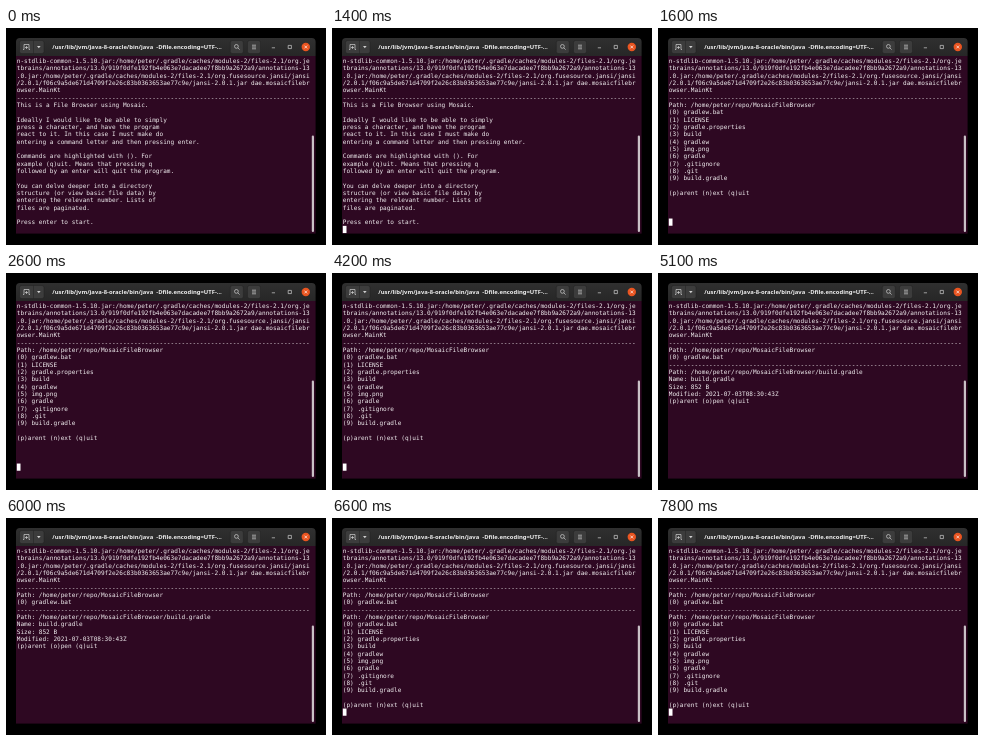
An HTML page for the animation above (8 s loop, 320 by 217 pixels).

```html
<!DOCTYPE html>
<html lang="en">
<head>
<meta charset="utf-8">
<title>Terminal file browser</title>
<style>
  html, body { margin: 0; width: 100%; height: 100%; overflow: hidden; background: #000; }
  svg { display: block; width: 320px; height: 217px; }
  text { white-space: pre; }
  .title { font: bold 5.86px "Noto Sans", "Open Sans", sans-serif; fill: #f0f0f0; }
  .row { font: 6.08px "DejaVu Sans Mono", "Liberation Mono", monospace; fill: #f2eff1; }
  .icon { fill: none; stroke: #d0d0d0; stroke-width: .7; }
  .button { fill: #3c3c3c; stroke: #222; stroke-width: .5; }
</style>
</head>
<body>
<svg viewBox="0 0 320 217">
  <defs>
    <linearGradient id="bar" x2="0" y2="1">
      <stop stop-color="#303030"/><stop offset="1" stop-color="#272727"/>
    </linearGradient>
  </defs>
  <rect width="320" height="217"/>
  <path d="M10 28V14a4 4 0 0 1 4-4H305.6a4 4 0 0 1 4 4V28Z" fill="url(#bar)"/>
  <rect x="10" y="28" width="299.6" height="177.6" fill="#2e0822"/>

  <rect class="button" x="13.5" y="12.5" width="24.5" height="13" rx="2"/>
  <path class="button" d="M27.5 12.5v13"/>
  <path class="icon" d="M17 21.5h1v-5h5v5h1M20.5 18v3M19 19.5h3"/>
  <path d="M31 18h3.6l-1.8 2.2z" fill="#d0d0d0"/>
  <text class="title" x="46.3" y="21.2">/usr/lib/jvm/java-8-oracle/bin/java  -Dfile.encoding=UTF-…</text>
  <rect class="button" x="224.3" y="12.5" width="13" height="13" rx="2"/>
  <circle class="icon" cx="230.4" cy="18.4" r="1.9"/>
  <path class="icon" d="M231.8 19.8l1.8 1.8"/>
  <rect class="button" x="241.5" y="12.5" width="13" height="13" rx="2"/>
  <path class="icon" d="M246 17.2h4M246 19h4M246 20.8h4"/>
  <path class="icon" d="M265.8 19.8h3.2M282.2 17.4h3.2v3.2h-3.2z"/>
  <circle cx="299.8" cy="19" r="4.2" fill="#e95420"/>
  <path class="icon" d="M298.4 17.6l2.8 2.8M301.2 17.6l-2.8 2.8" style="stroke:#fff"/>

  <rect x="305.8" y="107.5" width="2.2" height="96.6" rx="1.1" fill="#c9c1c6"/>
  <g id="rows"></g>
  <rect id="cursor" x="10.8" width="3.7" height="7.2" fill="#fff"/>
</svg>
<script>
const LOOP = 8000, TOP = 29.5, PITCH = 7.32;
const rule = "-".repeat(80);
const repo = "Path: /home/peter/repo/MosaicFileBrowser";
const cache = "/home/peter/.gradle/caches/modules-2/files-2.1/";

const head = [
  "n-stdlib-common-1.5.10.jar:" + cache + "org.je",
  "tbrains/annotations/13.0/919f0dfe192fb4e063e7dacadee7f8bb9a2672a9/annotations-13",
  ".0.jar:" + cache + "org.fusesource.jansi/jansi",
  "/2.0.1/f06c9a5de671d4709f2e26c83b0363653ae77c9e/jansi-2.0.1.jar dae.mosaicfilebr",
  "owser.MainKt",
  rule
];
const intro = `This is a File Browser using Mosaic.

Ideally I would like to be able to simply
press a character, and have the program
react to it. In this case I must make do
entering a command letter and then pressing enter.

Commands are highlighted with (). For
example (q)uit. Means that pressing q
followed by an enter will quit the program.

You can delve deeper into a directory
structure (or view basic file data) by
entering the relevant number. Lists of
files are paginated.

Press enter to start.`.split("\n");
const files = ["gradlew.bat", "LICENSE", "gradle.properties", "build", "gradlew",
  "img.png", "gradle", ".gitignore", ".git", "build.gradle"].map((f, i) => `(${i}) ${f}`);
const list = [repo, ...files, "", "(p)arent (n)ext (q)uit"];
const kept = [repo, files[0], rule];
const info = [repo + "/build.gradle", "Name: build.gradle", "Size: 852 B",
  "Modified: 2021-07-03T08:30:43Z", "(p)arent (o)pen (q)uit"];

// start time, lines below the header, cursor row
const scenes = [
  [0, intro, 23],
  [1500, list, 22],
  [4300, [...kept, ...info], 21],
  [6500, [...kept, ...list], 22]
];
// the cursor is hidden at 0 and flips at each of these times
const flips = [600, 1200, 1400, 2000, 2600, 3200, 3800, 4600, 5200, 5800, 6400, 7000, 7600];

const rows = document.getElementById("rows");
const cursor = document.getElementById("cursor");
const lines = Array.from({ length: 24 }, (_, i) => {
  const t = document.createElementNS("http://www.w3.org/2000/svg", "text");
  t.setAttribute("class", "row");
  t.setAttribute("x", 10.8);
  t.setAttribute("y", TOP + PITCH * i + 5.6);
  return rows.appendChild(t);
});

let shown;
function draw(ms) {
  const scene = scenes.filter(s => s[0] <= ms).pop();
  if (scene !== shown) {
    const text = [...head, ...scene[1]];
    lines.forEach((el, i) => { el.textContent = text[i] || ""; });
    cursor.setAttribute("y", TOP + PITCH * scene[2]);
    shown = scene;
  }
  const on = flips.filter(f => f <= ms).length % 2;
  cursor.setAttribute("visibility", on ? "visible" : "hidden");
}

let start;
function tick(now) {
  start ??= now;
  draw((now - start) % LOOP);
  requestAnimationFrame(tick);
}
draw(0);
requestAnimationFrame(tick);
</script>
</body>
</html>
```
